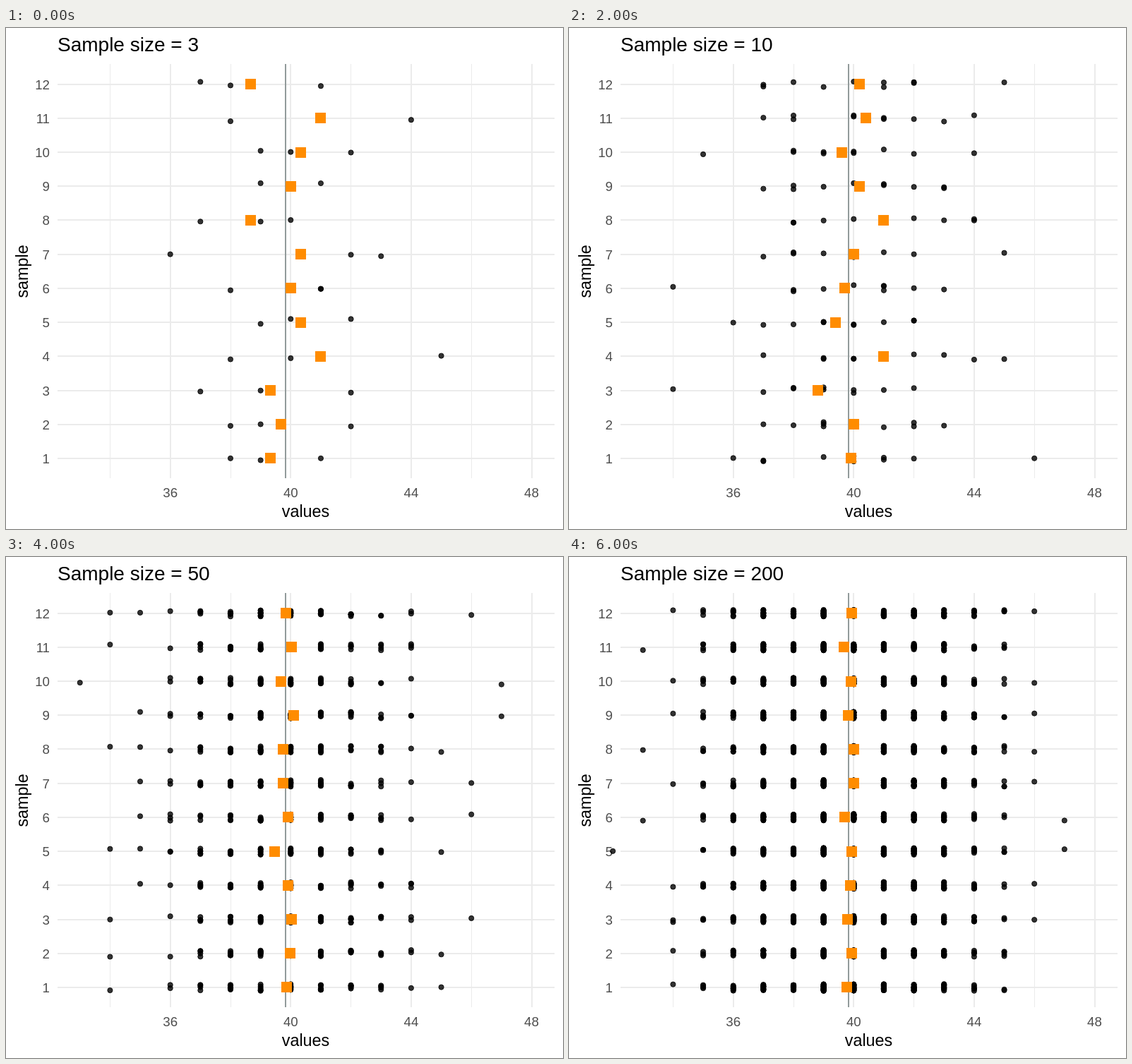
Write an HTML page with a canvas that moves like this. It is 789 by 710 pixels and loops after 7 s.

```html
<!DOCTYPE html>
<html lang="en">
<head>
<meta charset="utf-8">
<title>Sample means by sample size</title>
<style>
  html, body { margin: 0; width: 100%; height: 100%; overflow: hidden; background: #fff; }
  canvas { display: block; }
</style>
</head>
<body>
<canvas id="chart" width="789" height="710"></canvas>
<script>
const ctx = document.getElementById('chart').getContext('2d');
const HOLD = 1000;
const ROWS = 12;
const PANEL = { left: 73, right: 777, top: 51, bottom: 638 };
const POPULATION = { mean: 39.84, sd: 2.15 };
const JITTER = 4.8;
const GRID = '#ebebeb';
const TICK = '#4d4d4d';

// Key means of the small samples, from sample 1 upwards; larger ones are drawn at random.
const KEY_MEANS = {
  3: [39.3, 39.7, 39.3, 41, 40.3, 40, 40.3, 38.7, 40, 40.3, 41, 38.7],
  5: [39, 40, 38, 39.8, 40.4, 39.6, 39.6, 40.6, 40.2, 39.2, 39.6, 41.2],
  10: [39.9, 40, 38.8, 41, 39.4, 39.7, 40, 41, 40.2, 39.6, 40.4, 40.2],
  20: [40.1, 39.3, 40.4, 39.7, 39.8, 39.6, 40, 39.5, 39.2, 39.4, 39.7, 40.5]
};

const xOf = value => 403.3 + 42.65 * (value - 40);
const yOf = sample => 658.2 - 48.22 * sample;

function seededRandom(seed) {
  return () => {
    seed = (seed + 0x6D2B79F5) | 0;
    let t = Math.imul(seed ^ (seed >>> 15), 1 | seed);
    t = (t + Math.imul(t ^ (t >>> 7), 61 | t)) ^ t;
    return ((t ^ (t >>> 14)) >>> 0) / 4294967296;
  };
}

// Close approximation of the inverse normal distribution.
const normalQuantile = p => (p ** 0.135 - (1 - p) ** 0.135) / 0.1975;

// Whole-number values, normally spread, nudged until they have the wanted mean.
function drawSample(size, wantedMean, random) {
  const total = Math.round(size * wantedMean);
  const values = Array.from({ length: size }, (_, i) =>
    Math.round(wantedMean + POPULATION.sd * normalQuantile((i + random()) / size)));
  let missing = total - values.reduce((a, b) => a + b);
  while (missing) {
    const step = Math.sign(missing);
    values[Math.floor(random() * size)] += step;
    missing -= step;
  }
  const dots = values.map(value => ({ value, dy: JITTER * (2 * random() - 1) }));
  return { mean: total / size, dots };
}

function makeScene(size) {
  const random = seededRandom(size);
  const randomMean = () =>
    POPULATION.mean + POPULATION.sd / Math.sqrt(size) * normalQuantile(0.1 + 0.8 * random());
  const samples = Array.from({ length: ROWS }, (_, i) =>
    drawSample(size, KEY_MEANS[size]?.[i] ?? randomMean(), random));
  return { size, samples };
}

const scenes = [3, 5, 10, 20, 50, 100, 200].map(makeScene);

// Lines lie on whole pixels.
function vertical(value, width, color) {
  ctx.fillStyle = color;
  ctx.fillRect(Math.round(xOf(value) - width / 2), PANEL.top, width, PANEL.bottom - PANEL.top);
}

function horizontal(sample, width, color) {
  ctx.fillStyle = color;
  ctx.fillRect(PANEL.left, Math.round(yOf(sample) - width / 2), PANEL.right - PANEL.left, width);
}

function label(text, x, y, size, align, color = '#000') {
  ctx.font = `${size}px "Liberation Sans", Arial, sans-serif`;
  ctx.textAlign = align;
  ctx.fillStyle = color;
  ctx.fillText(text, x, y);
}

function drawAxes() {
  for (let value = 34; value <= 48; value += 2) {
    const major = value % 4 === 0;
    vertical(value, major ? 2 : 1, GRID);
    if (major) label(value, xOf(value), 665, 18.67, 'center', TICK);
  }
  for (let sample = 1; sample <= ROWS; sample++) {
    horizontal(sample, 2, GRID);
    label(sample, 62, Math.round(yOf(sample) + 7), 18.67, 'right', TICK);
  }
  label('values', 424.5, 693, 23.33, 'center');
  ctx.save();
  ctx.translate(31, 345);
  ctx.rotate(-Math.PI / 2);
  label('sample', 0, 0, 23.33, 'center');
  ctx.restore();
}

function drawDot(x, y) {
  ctx.beginPath();
  ctx.arc(x, y, 3.6, 0, 2 * Math.PI);
  ctx.fill();
  ctx.stroke();
}

function draw({ size, samples }) {
  ctx.fillStyle = '#fff';
  ctx.fillRect(0, 0, 789, 710);
  drawAxes();
  label(`Sample size = ${size}`, 73, 33, 28, 'left');
  vertical(POPULATION.mean, 2, '#929b9b');

  ctx.fillStyle = ctx.strokeStyle = 'rgba(0, 0, 0, 0.8)';
  ctx.lineWidth = 1;
  samples.forEach(({ dots }, i) =>
    dots.forEach(({ value, dy }) => drawDot(xOf(value), yOf(i + 1) + dy)));

  ctx.fillStyle = '#ff8c00';
  samples.forEach(({ mean }, i) =>
    ctx.fillRect(Math.round(xOf(mean) - 7.5), Math.round(yOf(i + 1) - 7.5), 15, 15));
}

let shown = -1;
const start = performance.now();

function tick() {
  const index = Math.floor((performance.now() - start) / HOLD) % scenes.length;
  if (index !== shown) draw(scenes[shown = index]);
  requestAnimationFrame(tick);
}
tick();
</script>
</body>
</html>
```
